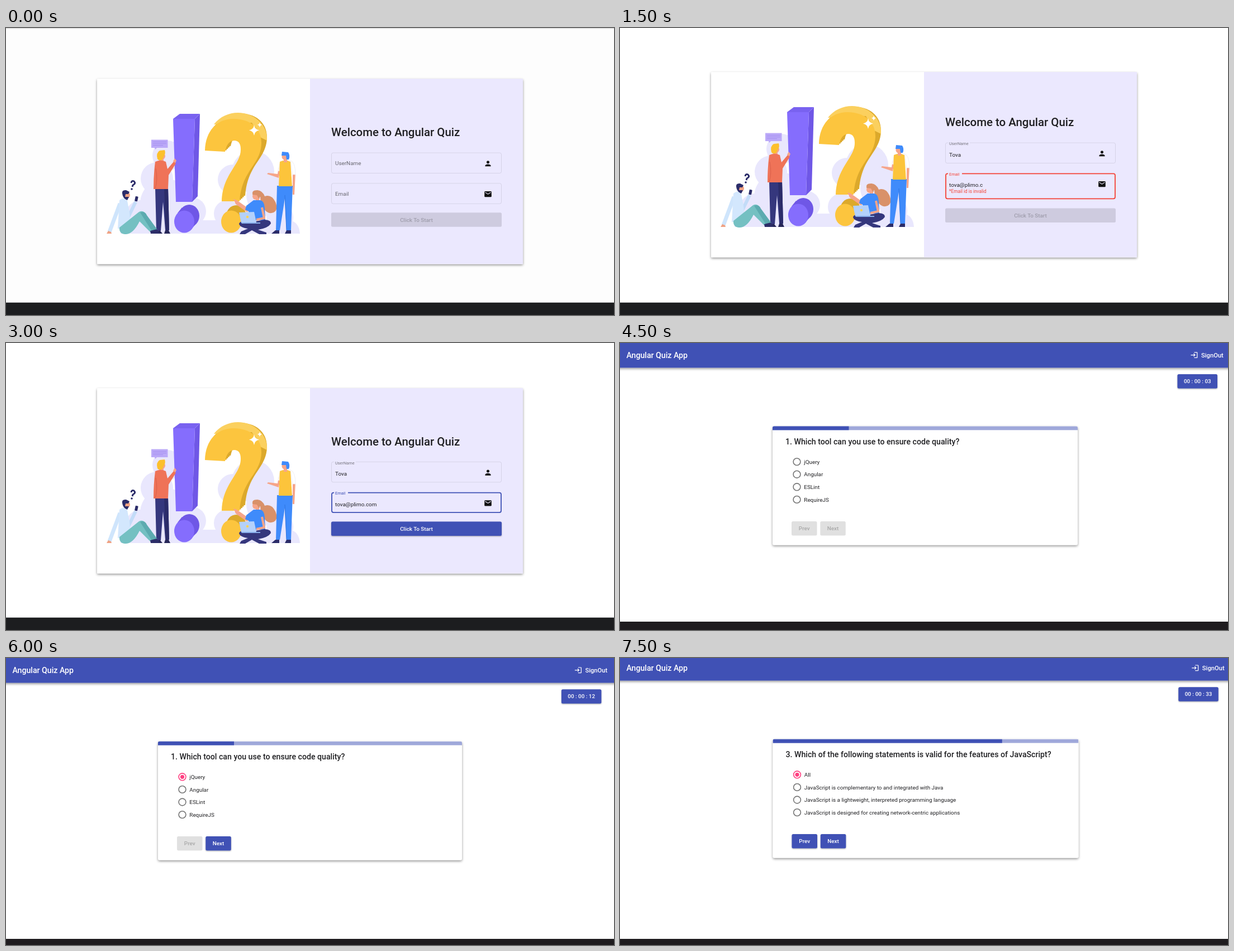
Write an HTML page that moves like this. It is 1088 px wide and 515 px high and loops after 8 s.

```html
<!DOCTYPE html>
<html lang="en">
<head>
<meta charset="utf-8">
<title>Quiz app walkthrough</title>
<style>
  html, body { margin: 0; width: 100%; height: 100%; overflow: hidden; background: #fff; }
  svg { display: block; width: 100%; height: 100%; font-family: Roboto, sans-serif; }
  .scene { display: none; }
  .scene.on { display: inline; }
</style>
</head>
<body>
<svg id="stage" viewBox="0 0 1088 515">
  <defs>
    <filter id="lift" x="-5%" y="-10%" width="110%" height="125%">
      <feDropShadow dx="0" dy="2" stdDeviation="2" flood-opacity=".42"/>
    </filter>
    <filter id="low" x="-10%" y="-20%" width="120%" height="160%">
      <feDropShadow dx="0" dy="1" stdDeviation="1" flood-opacity=".35"/>
    </filter>
    <path id="mark" d="M356 220C357 184 378 163 407 163C437 163 458 180 457 208C455 247 422 254 418 311H386C387 262 421 245 420 217C420 204 412 200 404 203C396 206 394 214 392 222Z"/>

    <g id="art">
      <g fill="#e9e7fd">
        <circle cx="289" cy="229" r="27"/><circle cx="270" cy="270" r="29"/>
        <circle cx="241" cy="336" r="27"/><circle cx="285" cy="315" r="45"/>
        <circle cx="333" cy="329" r="25"/><circle cx="406" cy="272" r="27"/>
        <circle cx="442" cy="258" r="38"/><circle cx="468" cy="300" r="38"/>
        <circle cx="396" cy="333" r="24"/><circle cx="490" cy="340" r="24"/>
        <path d="M205 369V345H505Q524 346 526 369Z"/>
      </g>

      <!-- exclamation mark -->
      <path d="M338 163L347 154L343 302L333 312Z" fill="#6f57e6"/>
      <path d="M299 163L311 154H347L338 163Z" fill="#7962f0"/>
      <path d="M299 163H338L333 312H304Z" fill="#856dfd"/>
      <ellipse cx="328" cy="337" rx="18" ry="20" fill="#6f57e6"/>
      <path d="M307 332L315 322L341 350L331 362Z" fill="#6f57e6"/>
      <ellipse cx="319" cy="347.500" rx="18" ry="20" fill="#856dfd"/>

      <!-- question mark -->
      <g fill="#dca92b">
        <use href="#mark" x="2.500" y="-2.500"/><use href="#mark" x="5" y="-5"/>
        <use href="#mark" x="7.500" y="-7.500"/><use href="#mark" x="10" y="-10"/>
        <ellipse cx="412" cy="338" rx="18" ry="20"/>
      </g>
      <path d="M372 173C392 147 430 146 452 166C464 177 468 190 467 202L455 196L440 170Z" fill="#fbd05e"/>
      <use href="#mark" fill="#fcc53e"/>
      <ellipse cx="403" cy="347.500" rx="18" ry="20" fill="#fcc53e"/>
      <path id="spark" d="M444 174Q445 182 453 183.500Q445 185 444 193Q443 185 435 183.500Q443 182 444 174Z" fill="#fff"/>
      <use href="#spark" transform="translate(232 82) scale(.5)"/>

      <!-- speech bubble -->
      <path d="M260 200.500H289.500V215H270L267 218L266 215H260Z" fill="#bba9f8"/>
      <path d="M263 204.500H287M263 207.500H287M263 210.500H281" stroke="#a48ff0" fill="none"/>

      <!-- standing man, left -->
      <path d="M267 287H290L292 363H285L281 312L277 364H269Z" fill="#35377d"/>
      <path d="M283 287H290L292 363H286Z" fill="#2b2c69"/>
      <path d="M267 369L269 364H276L280 369ZM283 369L285 363H291L294 369Z" fill="#272758"/>
      <path d="M299 239L302 234L305 238L302 244Z" fill="#f6a58a"/>
      <path d="M274 229H282V241H274Z" fill="#f6a58a"/>
      <path d="M267 240Q277 235 286 240L289 253L300 240L304 243L291 264L290 289H264Q264 262 267 240Z" fill="#ef7358"/>
      <path d="M268 252Q272 272 267 288" stroke="#da5f49" fill="none"/>
      <circle cx="279" cy="230" r="6" fill="#f6a58a"/>
      <path d="M271 235Q268 224 275 220L284 219Q286 225 283 229L279 237H273Z" fill="#fcc02d"/>

      <!-- sitting man -->
      <path d="M204 315L185 366" stroke="#cfe5fc" stroke-width="7"/>
      <path d="M183 364L188 366L189 369H180Z" fill="#f0a283"/>
      <path d="M219 339L232 312" stroke="#c3dcf8" stroke-width="6"/>
      <path d="M203 309Q211 302 217 310L221 331L224 360H200Z" fill="#d3e7fd"/>
      <path d="M203 358L238 330Q247 326 251 336L267 361L258 366L239 347Q228 369 215 370Q202 370 203 358Z" fill="#74c0c2"/>
      <path d="M240 331Q249 328 252 336L271 362L262 366Z" fill="#5dabb0"/>
      <path d="M258 364L270 361L275 369H259Z" fill="#2c2d68"/>
      <circle cx="216" cy="300" r="6" fill="#f0a283"/>
      <path d="M208 297Q207 290 215 291L221 294L219 298L214 298L213 303L220 303L217 309Q209 306 208 297Z" fill="#2b2c69"/>
      <rect x="231" y="302" width="5" height="9" rx="1" transform="rotate(12 233 306)" fill="#2b2c69"/>
      <path d="M224 278Q225 273 229 275Q233 279 227 282L226 285" fill="none" stroke="#2b2c69" stroke-width="3"/>
      <circle cx="225" cy="289" r="1.800" fill="#2b2c69"/>

      <!-- woman with laptop -->
      <path d="M442 300Q438 291 450 291Q459 292 463 302Q475 298 482 312Q488 326 479 331Q469 335 462 325Q455 314 455 303Z" fill="#d99169"/>
      <path d="M407 307L413 309L434 324L432 331L411 316Z" fill="#f6a58a"/>
      <path d="M447 303H453V312H447Z" fill="#f6a58a"/>
      <path d="M430 319L443 309H455Q462 310 463 323L464 345H437L434 329L428 326Z" fill="#3f8bfb"/>
      <path d="M458 322L462 341L448 344" fill="none" stroke="#f6a58a" stroke-width="4"/>
      <circle cx="447" cy="302" r="6" fill="#f6a58a"/>
      <path d="M441 299Q443 291 452 294Q457 299 453 307L449 300Z" fill="#d99169"/>
      <path d="M417 351Q421 343 440 348L463 344Q475 345 474 351Q469 359 451 362L466 367V370H453L440 363L428 370H418L421 365L433 360Q418 358 417 351Z" fill="#35377d"/>
      <path d="M417 331L444 330L448 349L421 350Z" fill="#b4d1fb"/>
      <path d="M421 349H455V351H422Z" fill="#88aeea"/>
      <circle cx="432" cy="339" r="2.300" fill="#fcd35d"/>

      <!-- standing man, right -->
      <path d="M485 283H513L510 363H502L499 306L490 363H483Z" fill="#3f8bfb"/>
      <path d="M499 300L502 363" stroke="#2d75e2"/>
      <path d="M475 369L482 363H489V369ZM499 369L502 363H510V369Z" fill="#2b2c69"/>
      <path d="M491 254L488 269L467 262L469 260L486 262L488 250ZM513 260H518L516 299H513Z" fill="#f6a58a"/>
      <path d="M491 239L487 256L492 258L509 239L513 263H518Q518 240 508 237Z" fill="#fff" stroke="#e8e8f3" stroke-width=".7"/>
      <path d="M490 240Q500 235 509 240L512 284H488Z" fill="#fcc43b"/>
      <path d="M497 230H503V241H497Z" fill="#f6a58a"/>
      <circle cx="499" cy="231" r="5.500" fill="#f6a58a"/>
      <path d="M493 229L494 222L505 223Q509 229 506 236L502 236L501 229Z" fill="#3f8bfb"/>
    </g>
  </defs>
</svg>
<script>
const INDIGO = '#3f51b5', PINK = '#ff4081', RED = '#f44336', INK = '#202023';
const BODY = 9.9, HOLD = 1500, LOOP = 8000;
const PERSON = 'M12 12a4 4 0 1 0 0-8a4 4 0 0 0 0 8zm0 2c-2.670 0-8 1.340-8 4v2h16v-2c0-2.660-5.330-4-8-4z';
const MAIL = 'M20 4H4a2 2 0 0 0-2 2v12a2 2 0 0 0 2 2h16a2 2 0 0 0 2-2V6a2 2 0 0 0-2-2zm0 4l-8 5-8-5V6l8 5 8-5z';
const EXIT = 'M11 7L9.600 8.400 12.200 11H2v2h10.200l-2.600 2.600L11 17l5-5zM20 19h-8v2h8a2 2 0 0 0 2-2V5a2 2 0 0 0-2-2h-8v2h8z';

const rect = (x, y, w, h, fill, extra = '') =>
  `<rect x="${x}" y="${y}" width="${w}" height="${h}" fill="${fill}" ${extra}/>`;
const text = (x, y, label, size = BODY, fill = INK, weight = 400, anchor = 'start') =>
  `<text x="${x}" y="${y}" font-size="${size}" fill="${fill}" font-weight="${weight}" text-anchor="${anchor}">${label}</text>`;
const icon = (d, cx, cy, fill = '#111', scale = .63) =>
  `<path d="${d}" fill="${fill}" transform="translate(${cx} ${cy}) scale(${scale}) translate(-12 -12)"/>`;
const button = (x, y, w, label, on, off = '#e0e0e0', offText = '#a8a8a8') =>
  rect(x, y, w, 25.5, on ? INDIGO : off, `rx="2.500" ${on ? 'filter="url(#low)"' : ''}`) +
  text(x + w / 2, y + 16.2, label, BODY, on ? '#fff' : offText, 500, 'middle');

function field(y, label, value, glyph, { color, error } = {}) {
  const inset = color ? .5 : 0;
  const stroke = color ? `stroke="${color}" stroke-width="1.800"` : 'stroke="#000" stroke-opacity=".09"';
  let out = rect(582.5 + inset, y + inset, 304 - 2 * inset, (error ? 46 : 36.5) - 2 * inset, 'none', `rx="3" ${stroke}`);
  if (value) {
    out += rect(587, y - 1.5, label.length > 5 ? 39 : 25, 4, '#ebe8fe')
      + text(589, y + 4.3, label, 7.4, color || '#77767f') + text(589, y + 24.6, value);
  } else out += text(589, y + 22, label, BODY, '#68676f');
  if (error) out += text(589, y + 35.4, error, 8.25, RED);
  return out + icon(glyph, 862.5, y + 19.3);
}

function login({ card, form, name, email, emailStyle, ready, back = '#fff' }) {
  const buttonY = form + (emailStyle?.error ? 117.5 : 107.3);
  return rect(0, 0, 1088, 515, back)
    + rect(163, card, 762, 332.5, '#fff', 'rx="1.500" filter="url(#lift)"')
    + rect(544, card, 381, 332.5, '#ebe8fe')
    + `<use href="#art" y="${card - 91}"/>`
    + text(582, form - 29.8, 'Welcome to Angular Quiz', 20.45, INK, 500)
    + field(form, 'UserName', name, PERSON)
    + field(form + 54.8, 'Email', email, MAIL, emailStyle)
    + button(582, buttonY, 305, 'Click To Start', ready, '#cecbdf', '#9f9dac')
    + rect(0, 492.7, 1088, 23, '#1c1d1f');
}

function quiz({ dy, right, x, w, share, question, answers, picked, prev, next, time, floor }) {
  const top = 149.3 + dy, h = 213.3, clip = 'clip' + time.slice(-2);
  const bar = (width, fill) => rect(x, top, width, 7, fill);
  const radios = answers.map((answer, i) => {
    const cy = top + 63.8 + i * 22.6, on = i === picked, color = on ? PINK : '#757575';
    return `<circle cx="${x + 43.5}" cy="${cy}" r="6.400" fill="none" stroke="${color}" stroke-width="1.600"/>`
      + (on ? `<circle cx="${x + 43.5}" cy="${cy}" r="3.600" fill="${PINK}"/>` : '')
      + text(x + 56.3, cy + 3.6, answer);
  }).join('');
  return rect(0, 0, 1088, 515, '#fff')
    + rect(-5, -10, 1098, 54.3 + dy, INDIGO, 'filter="url(#lift)"')
    + text(11.5, 26.6 + dy, 'Angular Quiz App', 14.15, '#fff', 500)
    + icon(EXIT, 1027.5 + right, 21.6 + dy, '#fff', .6)
    + text(1040 + right, 25.7 + dy, 'SignOut', 11.2, '#fff', 500)
    + button(997.5 + right, 56 + dy, 71.5, time, true)
    + rect(x, top, w, h, '#fff', 'rx="3" filter="url(#lift)"')
    + `<clipPath id="${clip}">${rect(x, top, w, h, '#fff', 'rx="3"')}</clipPath>`
    + `<g clip-path="url(#${clip})">${bar(w, '#9fa8da')}${bar(w * share, INDIGO)}</g>`
    + text(x + 23, top + 32.7, question, 14.15, INK, 500)
    + radios
    + button(x + 34, top + 170.6, 45.5, 'Prev', prev)
    + button(x + 85.3, top + 170.6, 45.5, 'Next', next)
    + rect(0, floor, 1088, 20, '#1f1c1f');
}

const tools = {
  share: .25, question: '1. Which tool can you use to ensure code quality?',
  answers: ['jQuery', 'Angular', 'ESLint', 'RequireJS']
};
const scenes = [
  login({ card: 91, form: 224, back: '#fdfdfd' }) + rect(0, 0, 1088, 1.3, '#d9d9d9'),
  login({ card: 79, form: 206, name: 'Tova', email: 'tova@plimo.c',
    emailStyle: { color: RED, error: '*Email id is invalid' } }),
  login({ card: 81, form: 213.3, name: 'Tova', email: 'tova@plimo.com',
    emailStyle: { color: INDIGO }, ready: true }),
  quiz({ ...tools, dy: 0, right: 0, x: 273, w: 546, time: '00 : 00 : 03', floor: 500 }),
  quiz({ ...tools, dy: .2, right: -3.6, x: 272, w: 544, picked: 0, next: true,
    time: '00 : 00 : 12', floor: 504 }),
  quiz({ dy: -3.8, right: 1.8, x: 273.5, w: 547, share: .75, picked: 0, prev: true, next: true,
    time: '00 : 00 : 33', floor: 504,
    question: '3. Which of the following statements is valid for the features of JavaScript?',
    answers: ['All', 'JavaScript is complementary to and integrated with Java',
      'JavaScript is a lightweight, interpreted programming language',
      'JavaScript is designed for creating network-centric applications'] })
];

const stage = document.getElementById('stage');
stage.insertAdjacentHTML('beforeend', scenes.map(s => `<g class="scene">${s}</g>`).join(''));
const groups = [...stage.querySelectorAll('.scene')];

const start = performance.now();
function tick() {
  const current = Math.floor((performance.now() - start) % LOOP / HOLD);
  groups.forEach((group, i) => group.classList.toggle('on', i === current));
  requestAnimationFrame(tick);
}
tick();
</script>
</body>
</html>
```
